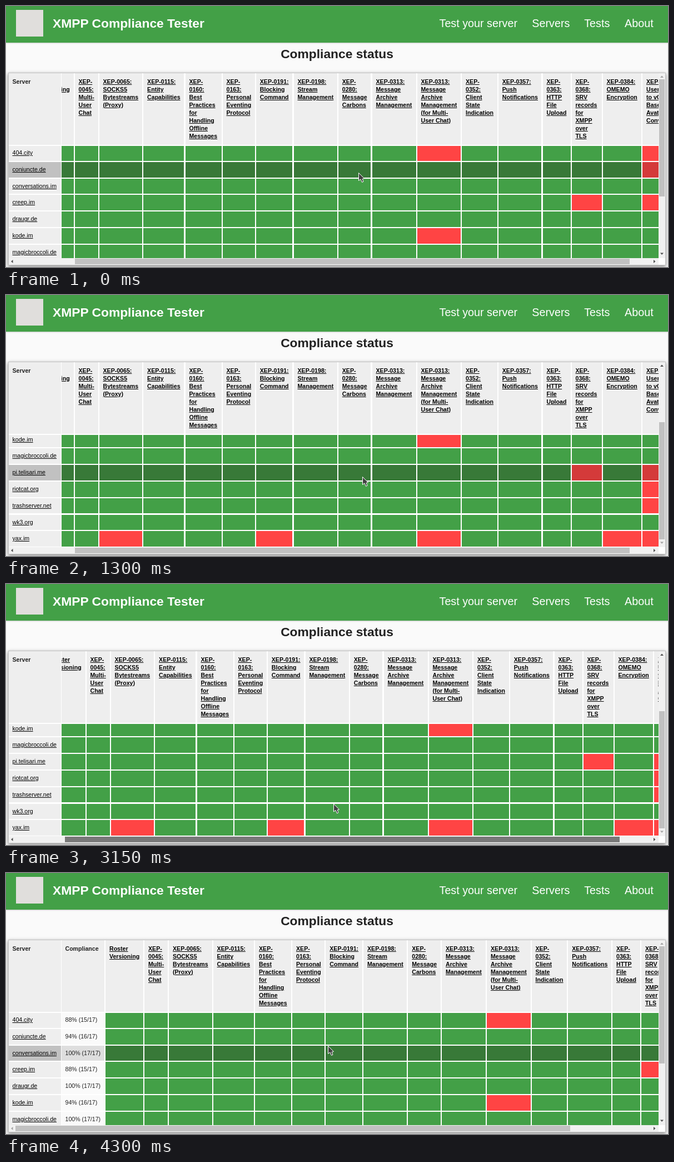
Recreate the animation shown at these times as an HTML page. Size 1191 by 470 pixels, loop 5.4 s.

```html
<!DOCTYPE html>
<html lang="en">
<head>
<meta charset="utf-8">
<title>Compliance status</title>
<style>
html, body { margin: 0; width: 100%; height: 100%; overflow: hidden; }
body { background: #fafafa; font-family: "Liberation Sans", Arial, sans-serif; color: #212121; }
#stage { position: relative; width: 1191px; height: 470px; overflow: hidden; }
#stage div, #stage svg { position: absolute; }
#stage .bar { left: 0; top: 0; width: 1191px; height: 66px; background: #43a047; color: #fff;
  box-shadow: 0 1px 2px rgba(0, 0, 0, .2); }
.logo { left: 18px; top: 7px; width: 49px; height: 48px; background: #e0dedc; }
.bar div { white-space: nowrap; line-height: 24px; }
.title, .heading { font-size: 22.8px; font-weight: bold; }
.title { left: 84px; top: 19px; }
.nav { top: 18.5px; font-size: 19.75px; }
.heading { left: 0; width: 1191px; top: 74px; line-height: 24px; text-align: center; }
.box { left: 4px; top: 120px; width: 1181px; height: 345px; border: 1px solid #c4c4c4;
  background: #fff; box-shadow: 0 2px 6px rgba(0, 0, 0, .5); }
.clip { overflow: hidden; font-size: 10.6px; line-height: 14px; white-space: nowrap; }
.clip u { color: #000; }
.head { background: #eee; font-weight: bold; height: 129px; top: 0; }
.head span { position: absolute; left: 7px; top: 7.7px; }
.cell { height: 27.8px; line-height: 27.8px; }
.cell span { padding-left: 7px; }
.server { left: 0; width: 93.5px; background: #eee; }
.score { background: #fafafa; }
.ok { background: #43a047; }
.fail { background: #ff4444; }
.hover .server { background: #c1c1c1; }
.hover .score { background: #dedede; }
.hover .ok { background: #387938; }
.hover .fail { background: #d43a3a; }
.track { background: #f1f1f1; }
.thumb { background: #c1c1c1; }
.thumb.held { background: #787878; }
.arrow { fill: #505050; }
.arrow.off { fill: #a3a3a3; }
</style>
</head>
<body>
<div id="stage">
  <div class="bar">
    <div class="logo"></div>
    <div class="title">XMPP Compliance Tester</div>
    <div class="nav" style="left:779.5px">Test your server</div>
    <div class="nav" style="left:946.3px">Servers</div>
    <div class="nav" style="left:1040.2px">Tests</div>
    <div class="nav" style="left:1113px">About</div>
  </div>
  <div class="heading">Compliance status</div>
  <div class="box"></div>
  <div class="clip" style="left:5px;top:121px;width:93.5px;height:129px">
    <div class="head" style="left:0;width:93.5px"><span style="left:6.5px">Server</span></div>
  </div>
  <div class="clip" style="left:99.5px;top:121px;width:1074.5px;height:129px"><div id="heads"></div></div>
  <div class="clip" style="left:5px;top:252px;width:93.5px;height:202px"><div id="names"></div></div>
  <div class="clip" style="left:99.5px;top:252px;width:1074.5px;height:202px"><div id="cells"></div></div>
  <div class="track" style="left:1174px;top:121px;width:12px;height:333px"></div>
  <div class="track" style="left:5px;top:454px;width:1169px;height:12px"></div>
  <div class="thumb" id="vThumb" style="left:1175px;width:10px;height:211px"></div>
  <div class="thumb" id="hThumb" style="top:455px;width:998px;height:10px"></div>
  <svg width="1191" height="470" style="left:0;top:0">
    <path class="arrow" id="up" d="M1177 129l3-3.5 3 3.5z"/>
    <path class="arrow" id="down" d="M1177 444.5l3 3.5 3-3.5z"/>
    <path class="arrow" id="left" d="M12.5 457l-3.5 3 3.5 3z"/>
    <path class="arrow" id="right" d="M1165 457l3.5 3-3.5 3z"/>
    <path id="cursor" fill="#424242" stroke="#fff" d="M.5.5V14.5L4 11.9 6.5 17.5 9 16.2 7.2 11.3 10.5 10.6z"/>
  </svg>
</div>
<script>
const LOOP = 5400, STEP = 50, PITCH = 29.8, GAP = 2;
const MAX_X = 171, MAX_Y = 153.5, ORIGIN = 99.5;

const heads = [
  'Compliance', 'Roster|Versioning', 'XEP-|0045:|Multi-|User|Chat',
  'XEP-0065:|SOCKS5|Bytestreams|(Proxy)', 'XEP-0115:|Entity|Capabilities',
  'XEP-|0160:|Best|Practices|for|Handling|Offline|Messages',
  'XEP-|0163:|Personal|Eventing|Protocol', 'XEP-0191:|Blocking|Command',
  'XEP-0198:|Stream|Management', 'XEP-|0280:|Message|Carbons',
  'XEP-0313:|Message|Archive|Management',
  'XEP-0313:|Message|Archive|Management|(for Multi-|User Chat)',
  'XEP-|0352:|Client|State|Indication', 'XEP-0357:|Push|Notifications',
  'XEP-|0363:|HTTP|File|Upload', 'XEP-|0368:|SRV|records|for|XMPP|over|TLS',
  'XEP-0384:|OMEMO|Encryption',
  'XEP-0398:|User Avatar|to vCard-|Based|Avatars|Conversion'
];
const lefts = [99.5, 179, 249, 293, 372.6, 448, 515, 575.3, 643, 723.3, 784, 865,
  945.5, 1011.3, 1091, 1143, 1199, 1270.5, 1347];

// Server name followed by the columns it fails
const servers = [
  ['404.city', 11, 17], ['coniuncte.de', 17], ['conversations.im'],
  ['creep.im', 15, 17], ['draugr.de'], ['kode.im', 11], ['magicbroccoli.de'],
  ['pi.telisari.me', 15, 17], ['riotcat.org', 17], ['trashserver.net', 17],
  ['wk3.org'], ['yax.im', 3, 7, 11, 16, 17]
];

const $ = id => document.getElementById(id);
function add(parent, cls, style, html = '') {
  const el = document.createElement('div');
  el.className = cls;
  el.innerHTML = html;
  Object.assign(el.style, style);
  parent.append(el);
  return el;
}
const column = i => ({
  left: lefts[i] - ORIGIN + 'px',
  width: lefts[i + 1] - lefts[i] - GAP + 'px'
});

heads.forEach((text, i) => {
  const lines = text.split('|').map(s => i ? `<u>${s}</u>` : s).join('<br>');
  add($('heads'), 'head', column(i), `<span>${lines}</span>`);
});

const rows = servers.map(([name, ...fails], r) => {
  const top = { top: r * PITCH - 1 + 'px' };
  const label = add($('names'), '', top);
  const row = add($('cells'), '', top);
  add(label, 'cell server', {}, `<span style="padding-left:6.5px"><u>${name}</u></span>`);
  const passed = 17 - fails.length;
  const score = `${Math.floor(passed / 17 * 100)}% (${passed}/17)`;
  heads.forEach((_, i) => {
    const kind = !i ? 'score' : fails.includes(i) ? 'fail' : 'ok';
    add(row, 'cell ' + kind, column(i), i ? '' : `<span>${score}</span>`);
  });
  return [label, row];
});

// Each key: end time, duration of the move, target values
const cursorKeys = [
  [0, STEP, 634, 300], [1300, 300, 641, 327], [2400, STEP, 687, 462],
  [2700, 300, 1011, 427], [2900, STEP, 999, 430], [3050, STEP, 740, 412],
  [3150, STEP, 589, 395.5], [3350, STEP, 470, 385], [3550, STEP, 502, 330],
  [3700, STEP, 545, 321], [3800, STEP, 578, 309], [4300, 100, 579, 311]
];
const scrollXKeys = [
  [0, STEP, 125.5], [2400, STEP, 130], [2500, 100, MAX_X],
  [3050, STEP, 150], [3150, STEP, 104.5], [3350, STEP, 0]
];
// Start time and highlighted row
const hoverKeys = [[0, 1], [600, -1], [900, 6], [1100, 7], [2400, -1],
  [3550, 8], [3700, 7], [4000, -1], [4100, 2]];

const clamp = v => Math.min(1, Math.max(0, v));
function sample(keys, t) {
  let value = keys[0].slice(2);
  for (const [end, span, ...to] of keys) {
    const u = clamp((t - end + span) / span);
    value = value.map((v, i) => v + (to[i] - v) * u);
  }
  return value;
}
function scrollY(t) {
  if (t >= 4100) return 0;
  if (t >= 4000) return 62;
  return MAX_Y * (1 - (1 - clamp((t - 550) / 350)) ** 2.6);
}

function draw(t) {
  const [cx, cy] = sample(cursorKeys, t);
  const [sx] = sample(scrollXKeys, t);
  const sy = scrollY(t);
  const hover = hoverKeys.filter(k => k[0] <= t).pop()[1];
  $('heads').style.left = $('cells').style.left = -sx + 'px';
  $('names').style.top = $('cells').style.top = -sy + 'px';
  $('hThumb').style.left = 17.3 + sx * .8515 + 'px';
  $('vThumb').style.top = 132 + sy * .635 + 'px';
  $('hThumb').classList.toggle('held', t >= 2400 && t < 3550);
  $('up').classList.toggle('off', sy <= 0);
  $('down').classList.toggle('off', sy >= MAX_Y);
  $('left').classList.toggle('off', sx <= 0);
  $('right').classList.toggle('off', sx >= MAX_X);
  $('cursor').setAttribute('transform', `translate(${cx} ${cy})`);
  rows.forEach((parts, i) => parts.forEach(el => el.classList.toggle('hover', i === hover)));
}

const start = performance.now();
function tick() {
  const t = (performance.now() - start) % LOOP;
  draw(Math.floor(t / STEP) * STEP);
  requestAnimationFrame(tick);
}
tick();
</script>
</body>
</html>
```
